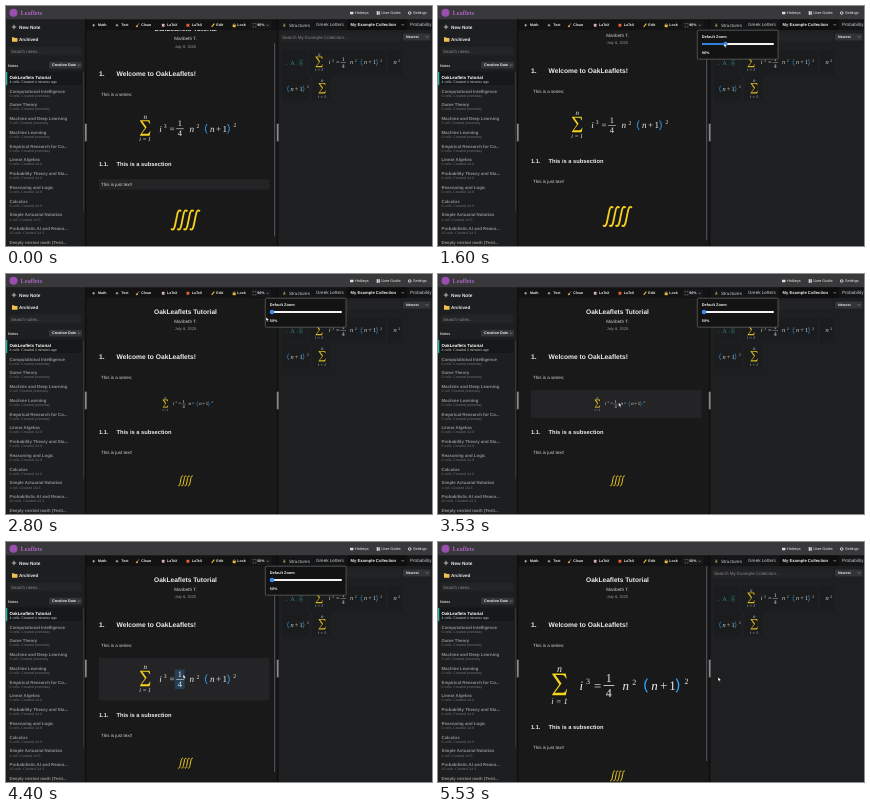
Recreate the animation shown at these times as an HTML page. Size 426 by 240 pixels, loop 5.59 s.

```html
<!DOCTYPE html>
<html lang="en">
<head>
<meta charset="utf-8">
<title>Notebook zoom</title>
<style>
html, body { margin: 0; width: 100%; height: 100%; overflow: hidden; background: #19191a; }
svg { display: block; width: 100vw; height: 100vh; }
text { font-family: "Liberation Sans", Arial, sans-serif; text-rendering: geometricPrecision; white-space: pre; }
.b { font-weight: 700; }
.m { text-anchor: middle; }
.serif { font-family: "Liberation Serif", Times, serif; }
.it { font-style: italic; }
</style>
</head>
<body>
<svg id="stage" viewBox="0 0 426 240" xmlns="http://www.w3.org/2000/svg"></svg>
<script>
const NS = "http://www.w3.org/2000/svg";
const stage = document.getElementById("stage");
const YELLOW = "#f6d21c", BLUE = "#2f9cf0", TEAL = "#2f9c88", WHITE = "#ececec";

function add(parent, tag, attrs, str) {
  const el = document.createElementNS(NS, tag);
  for (const k in attrs) el.setAttribute(k, attrs[k]);
  if (str !== undefined) el.textContent = str;
  parent.appendChild(el);
  return el;
}
const group = (p, attrs = {}) => add(p, "g", attrs);
const box = (p, x, y, w, h, fill, extra = {}) =>
  add(p, "rect", { x, y, width: w, height: h, fill, ...extra });
const path = (p, d, stroke, width = 0.6, fill = "none") =>
  add(p, "path", { d, stroke, "stroke-width": width, fill });
const dot = (p, cx, cy, r, fill) => add(p, "circle", { cx, cy, r, fill });
// y is the optical middle of the capitals
function label(p, x, y, size, str, cls = "", fill = WHITE) {
  return add(p, "text", { x, y: y + size * 0.36, "font-size": size, class: cls, fill }, str);
}
const caret = (p, x, y) => path(p, `M${x - 1.1},${y - 0.6}l1.1,1.1l1.1,-1.1`, "#ccc", 0.5);

// Formula parts, drawn around the formula's middle
const letter = (g, x, y, size, str) =>
  add(g, "text", { x, y, "font-size": size, class: "serif m it", fill: WHITE }, str);
const digit = (g, x, y, size, str) =>
  add(g, "text", { x, y, "font-size": size, class: "serif m", fill: WHITE }, str);

function sum(g, x) {
  path(g, `M${x - 7.2},-12h13.4l1,5h-.8q-1,-3.5 -4,-3.5h-6.4l6,8.5l-6.8,9.2h8.2q2.5,0 3.4,-3.5h.7l-1.2,6.1h-13.5v-1l7,-9.7l-7,-10z`, "none", 0, YELLOW);
  letter(g, x, -14, 10, "n");
  letter(g, x, 18, 8.5, "i = 1");
}
function term(g) {
  letter(g, -38.3, 4, 13, "i");
  digit(g, -31.5, -1.5, 8, "3");
  digit(g, -21.8, 4, 13, "=");
  const mark = box(g, -18, -14, 14, 28, "#263f55", { visibility: "hidden" });
  digit(g, -10.7, -3.3, 12, "1");
  box(g, -16, -0.3, 10.8, 0.8, WHITE);
  digit(g, -10.7, 11, 12, "4");
  return mark;
}
function square(g) {
  letter(g, 6.2, 4, 13, "n");
  digit(g, 14.7, -1, 8, "2");
}
function bracket(g) {
  path(g, "M27.8,-6.8q-5,6.8 0,13.6M56.8,-6.8q5,6.8 0,13.6", BLUE, 1.4);
  letter(g, 35, 4, 13, "n");
  digit(g, 44.2, 4, 13, "+");
  digit(g, 53, 4, 13, "1");
  digit(g, 67, -2, 8, "2");
}

// Notebook page
box(stage, 0, 0, 426, 240, "#19191a");
const clip = add(add(stage, "defs", {}), "clipPath", { id: "page" });
box(clip, 81, 24, 190, 216, "#fff");
const view = group(stage, { "clip-path": "url(#page)" });
const page = group(view);
const mathCell = box(page, 93, 116, 170.5, 30, "#242426");
const textCell = box(page, 93, 0, 170.5, 10.5, "#242426");
label(page, 179.5, 37.5, 6.6, "OakLeaflets Tutorial", "b m");
label(page, 179.5, 47, 4.6, "Maribeth T.", "m", "#d0d0d0");
label(page, 179.5, 54.6, 4, "July 8, 2025", "m", "#98989a");
label(page, 93, 82.5, 6.7, "1.", "b");
label(page, 110.5, 82.5, 6.7, "Welcome to OakLeaflets!", "b");
label(page, 95, 103, 4.5, "This is a series:", "", "#d5d5d5");
const math = group(page);
sum(math, -60);
const mark = term(math);
square(math);
bracket(math);
const lower = group(page);
label(lower, 93, 0, 5.6, "1.1.", "b");
label(lower, 110.5, 0, 5.75, "This is a subsection", "b");
label(lower, 95, 20.3, 4.5, "This is just text!", "", "#d5d5d5");
const integral = group(page);
for (let i = 0; i < 4; i++) {
  const x = (i - 1.5) * 6.5;
  path(integral, `M${x - 5.2},9c2.2,2.8 3.6,-.6 4.3,-4.5l1.8,-9c.7,-4 2.1,-7.3 4.3,-4.5`, YELLOW, 1.9);
}
const thumb = box(view, 268, 24, 1.2, 200, "#4c4c4e", { rx: 0.6 });

// Header
box(stage, 0, 0, 426, 13.5, "#39393b");
dot(stage, 7.5, 6.8, 4, "#9a4fb0");
label(stage, 14.5, 7, 6.4, "Leaflets", "b serif", "#a964bd");
box(stage, 344, 5.7, 3.4, 2.6, "#ddd", { rx: 0.5 });
label(stage, 349, 7, 3.8, "Hotkeys");
box(stage, 370.7, 5.2, 1.4, 3.6, "#ddd");
box(stage, 372.4, 5.2, 1.4, 3.6, "#ddd");
label(stage, 375.3, 7, 3.8, "User Guide");
add(stage, "circle", { cx: 403.7, cy: 7, r: 1.3, fill: "none", stroke: "#ddd", "stroke-width": 0.9 });
label(stage, 407, 7, 3.8, "Settings");

// Sidebar
box(stage, 0, 13.5, 79, 226.5, "#1d1e1f");
path(stage, "M8,18.8v4.4M5.8,21h4.4", WHITE, 0.7);
label(stage, 13, 21, 4.7, "New Note", "b");
path(stage, "M6,31.3h2l.7,.8h2.8v3.6h-5.5z", "none", 0, "#efc04a");
label(stage, 13, 33.5, 4.5, "Archived", "b");
box(stage, 2.5, 40.5, 73, 9, "#232425", { rx: 1 });
label(stage, 5, 45, 4.45, "Search notes...", "", "#8b8b8d");
label(stage, 2, 59.2, 3.7, "Notes", "b", "#d0d0d0");
box(stage, 43, 55.7, 33, 6.8, "#333436", { rx: 1 });
label(stage, 46, 59.1, 3.7, "Creation Date", "b");
caret(stage, 73, 59.1);
box(stage, 0, 65.5, 76, 13.5, "#161718");
box(stage, 0, 66, 1.3, 13, "#2cb5a0");
const notes = [
  ["OakLeaflets Tutorial", "4 cells", "4 minutes ago"],
  ["Computational Intelligence", "0 cells", "yesterday"],
  ["Game Theory", "0 cells", "yesterday"],
  ["Machine and Deep Learning", "1 cell", "yesterday"],
  ["Machine Learning", "0 cells", "yesterday"],
  ["Empirical Research for Co...", "0 cells", "yesterday"],
  ["Linear Algebra", "0 cells", "Jul 8"],
  ["Probability Theory and Sta...", "0 cells", "Jul 8"],
  ["Reasoning and Logic", "0 cells", "Jul 8"],
  ["Calculus", "0 cells", "Jul 8"],
  ["Simple Actuarial Notation", "1 cell", "Jul 3"],
  ["Probabilistic AI and Reaso...", "10 cells", "Jul 3"],
  ["Deeply nested math (Testi...", "0 cells", "Jul 3"]
];
notes.forEach(([name, cells, made], i) => {
  const y = 71.2 + i * 13.77;
  label(stage, 3.5, y, 4.35, name, "b", i ? "#8e8f91" : "#fff");
  label(stage, 3.5, y + 4.4, 3.5, `${cells}  Created ${made}`, "", i ? "#737476" : "#cfcfcf");
});
box(stage, 77, 66, 1, 139, "#343536", { rx: 0.5 });

// Toolbar
box(stage, 79, 13.5, 193, 10.5, "#121213");
const zoomButton = box(stage, 244.5, 15, 21, 8, "#18181a", { rx: 1 });
const tools = [
  [92, "Math"], [115.3, "Text"], [135.3, "Clean"], [161, "LaTeX"],
  [185.7, "LaTeX"], [210.3, "Edit"], [231.3, "Lock"]
];
tools.forEach(([x, name]) => label(stage, x, 19.2, 3.6, name, "b"));
for (const x of [87.7, 111]) path(stage, `M${x - 1.3},19.2h2.6M${x},17.9v2.6`, "#eee", 0.6);
path(stage, "M133,17.3l-1.6,2.2", "#c98a45", 0.7);
path(stage, "M131,19l1.4,1l-1.5,1.2l-1.2,-.8z", "none", 0, "#e6c350");
box(stage, 155.9, 17.8, 2.6, 3, "#d0b4b4", { rx: 0.5 });
box(stage, 180.5, 17.8, 2.8, 3, "#dd6238", { rx: 0.5 });
path(stage, "M205.6,20.8l2.8,-3.2", "#efc23e", 1.1);
box(stage, 226.7, 18.8, 3, 2.4, "#eebc3a");
path(stage, "M227.3,19v-.7q.9,-1.6 1.8,0v.7", "#ccc", 0.5);
path(stage, "M247,18.5v-1h1M249,17.5h1v1M250,20v1h-1M248,21h-1v-1", "#aaa", 0.4);
const zoomText = label(stage, 251.3, 19.2, 3.6, "96%", "b");
caret(stage, 261.7, 19.3);

// Right panel
box(stage, 271.5, 13.5, 154.5, 226.5, "#1e1f20");
box(stage, 271.5, 13.5, 154.5, 10.5, "#141516");
box(stage, 341.5, 13.5, 59, 10.5, "#0e0e0f");
path(stage, "M278.3,17l-1.5,3.4h3z", "none", 0, "#8f8348");
label(stage, 283, 19, 4.6, "Structures", "", "#c8c8c8");
label(stage, 310, 18.7, 4.6, "Greek Letters", "", "#c8c8c8");
label(stage, 344.5, 18.8, 4.2, "My Example Collection", "b");
path(stage, "M395.3,18.8h3", "#aaa", 0.6);
label(stage, 404, 18.7, 4.6, "Probability", "", "#c8c8c8");
box(stage, 274, 26.5, 121, 9, "#222324", { rx: 1 });
label(stage, 276, 31, 4.55, "Search My Example Collection...", "", "#858587");
box(stage, 397, 27.5, 27.5, 7, "#333436", { rx: 1 });
label(stage, 400, 31, 3.6, "Newest", "b");
caret(stage, 421, 31);
const cards = [[276, 44, 24], [303, 44, 76], [382, 44, 15], [276, 70, 27], [306, 70, 19]];
cards.forEach(([x, y, w]) =>
  box(stage, x, y, w, 24.5, "#1b1c1d", { rx: 1.5 }));
const mini = (x, y) => group(stage, { transform: `translate(${x},${y}) scale(.49)`, opacity: 0.85 });
const first = mini(288, 57);
const teal = (x, size, str) =>
  add(first, "text", { x, y: 4, "font-size": size, class: "serif m", fill: TEAL }, str);
teal(-15, 9, "∴");
teal(-3, 13, "A");
teal(7, 12, ":");
for (const y of [-6, 1]) box(first, 12, y, 4.5, 4.5, "none", { stroke: TEAL, "stroke-width": 0.8 });
const full = mini(342.5, 56.5);
[term, square, bracket].forEach(part => part(full));
sum(full, -60);
square(mini(386, 56.5));
bracket(mini(269, 82.8));
sum(mini(345.5, 82.8), -60);

// Splitters
for (const x of [79, 270.9]) {
  box(stage, x, 13.5, 1.4, 226.5, "#0f0f10");
  box(stage, x - 0.1, 117.5, 1.8, 18, "#8a8a8c", { rx: 0.8 });
}

// Zoom popup, tooltip, pointer
const popup = group(stage);
box(popup, 259.3, 24.2, 80.8, 29, "#131314", { rx: 1, stroke: "#77777a", "stroke-width": 0.6 });
label(popup, 263.8, 30.2, 3.9, "Default Zoom", "b");
box(popup, 264, 37, 72, 2, "#f4f4f4", { rx: 1 });
const fill = box(popup, 264, 37, 10, 2, "#2f7fe0", { rx: 1 });
const knob = dot(popup, 266, 38, 2.3, "#3b8df0");
const popupText = label(popup, 263.8, 46.8, 3.8, "96%", "b");
const tip = group(stage);
box(tip, 243, 23.2, 41, 5.8, "#050505", { rx: 0.8, stroke: "#444", "stroke-width": 0.3 });
label(tip, 263.5, 26.1, 3.05, "Change default zoom level", "m");
const pointer = path(stage, "M0,0v4.2l1,-.9l.7,1.5l.8,-.4l-.7,-1.4h1.3z", "#111", 0.4, "#fff");

// Motion tables: time, value(s)
const scrollSteps = [[0, 14.5], [70, 14.5], [270, 18]];
const zoomSteps = [[0, 96], [2070, 96], [2270, 89], [2600, 50]];
const cellSteps = [[3870, 50], [4070, 66], [4800, 136]];
const pointerSteps = [
  [0, 200, 179], [70, 200, 179], [600, 262, 24], [800, 262.5, 20], [1270, 262.5, 20],
  [1670, 288, 38.5], [2000, 288, 39], [2270, 276.5, 39.5], [2600, 262, 41], [2800, 260, 43],
  [3070, 260, 43], [3600, 177, 132.5], [4870, 177, 132.5], [5000, 200.5, 131],
  [5270, 280, 135], [5590, 280, 135]
];
function at(steps, t, i = 1) {
  const n = steps.findIndex(s => s[0] > t);
  if (n < 0) return steps[steps.length - 1][i];
  if (n === 0) return steps[0][i];
  const a = steps[n - 1], b = steps[n];
  const u = (t - a[0]) / (b[0] - a[0]);
  return a[i] + (b[i] - a[i]) * u * u * (3 - 2 * u);
}
const set = (el, attrs) => { for (const k in attrs) el.setAttribute(k, attrs[k]); };
const show = (el, on) => el.setAttribute("visibility", on ? "visible" : "hidden");
const cellHeight = z => 12.3 + 0.314 * z;

const LOOP = 5590, TICK = 200 / 3;
function draw(t) {
  const zoom = at(zoomSteps, t);
  const cellZoom = t < 3870 ? zoom : at(cellSteps, t);
  const px = at(pointerSteps, t, 1), py = at(pointerSteps, t, 2);
  const h = cellHeight(cellZoom), h2 = cellHeight(zoom);
  const heading = 116 + h + 14.2;
  const textY = heading + 20.3;
  const intY = textY + 14.3 + h2 / 2;
  const bottom = intY + h2 / 2 + 11;
  const range = Math.max(0, bottom - 238);
  const scroll = t < 2600 ? Math.min(at(scrollSteps, t), range) : 0;

  set(page, { transform: `translate(0,${-scroll})` });
  set(math, { transform: `translate(181.5,${116 + h / 2}) scale(${cellZoom / 136})` });
  set(lower, { transform: `translate(0,${heading})` });
  set(integral, { transform: `translate(179.5,${intY}) scale(${zoom / 100})` });
  set(mathCell, { height: h });
  set(textCell, { y: textY - 5.2 });
  const k = 214 / (214 + range);
  set(thumb, { y: 24 + scroll * k, height: 214 * k });
  show(thumb, range > 0);

  const inside = (top, height) =>
    px > 93 && px < 263 && py + scroll > top && py + scroll < top + height;
  show(mathCell, inside(116, h));
  show(textCell, inside(textY - 5.2, 10.5));
  show(mark, t >= 3660 && t < 5330);
  show(popup, t >= 1260 && t < 5330);
  show(tip, t >= 790 && t < 1260);
  show(pointer, t >= 130);
  set(zoomButton, { fill: t > 590 && t < 1400 ? "#2c2c2f" : "#18181a" });
  set(pointer, { transform: `translate(${px},${py})` });

  const x = 266 + (zoom - 50) * 0.465;
  set(knob, { cx: x });
  set(fill, { width: x - 264 });
  zoomText.textContent = popupText.textContent = Math.round(zoom) + "%";
}

const start = performance.now();
function frame() {
  const t = (performance.now() - start) % LOOP;
  draw(Math.floor((t + 3.4) / TICK) * TICK);
  requestAnimationFrame(frame);
}
frame();
</script>
</body>
</html>
```
